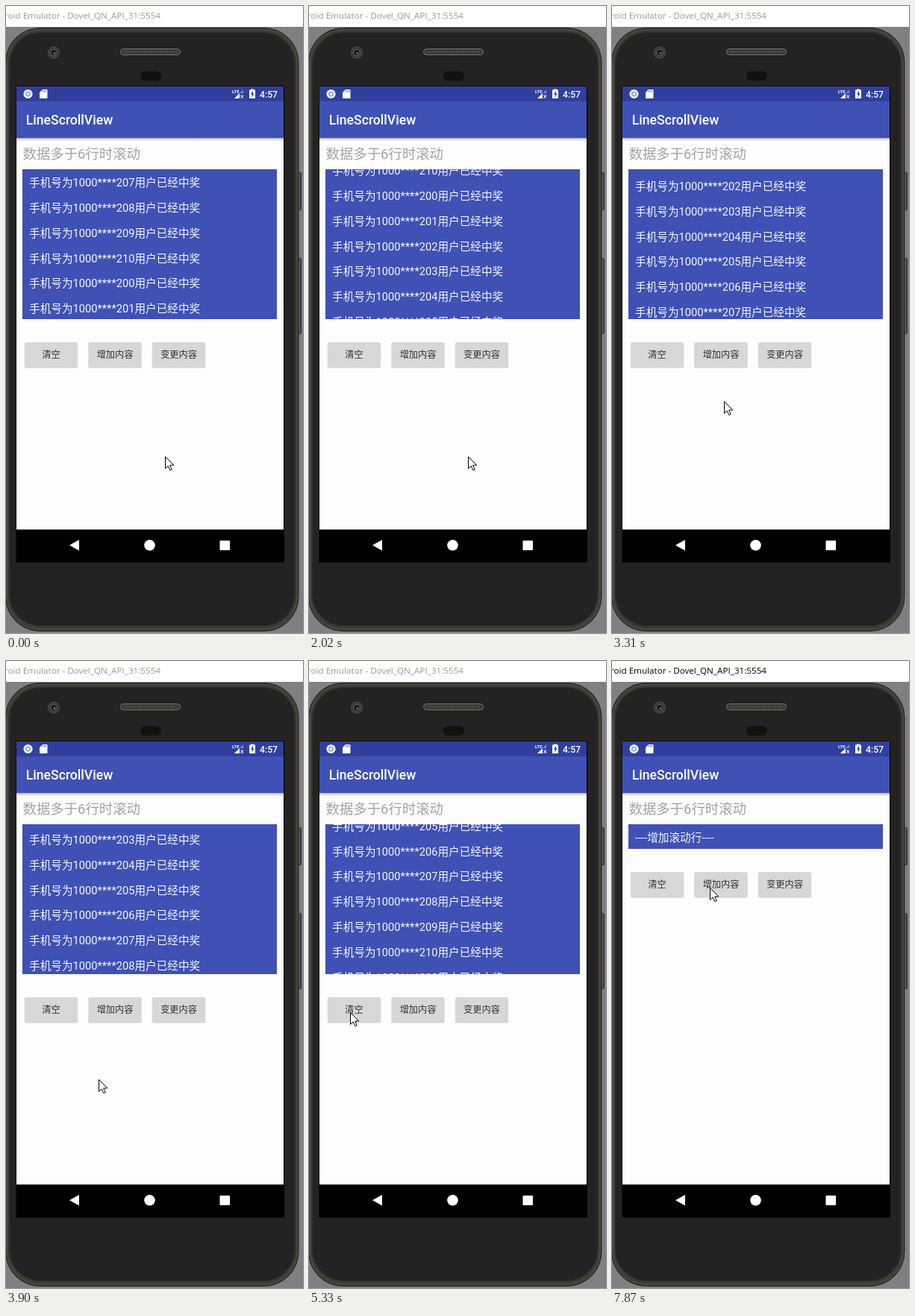
Animation of 398x841 px, one loop 8 s. Source, as an HTML page:

```html
<!DOCTYPE html>
<html lang="zh-CN">
<head>
<meta charset="utf-8">
<title>LineScrollView</title>
<style>
  html, body { margin: 0; width: 100%; height: 100%; overflow: hidden; background: #808080; }
  svg { display: block; width: 398px; height: 841px; }
  text { font-family: Roboto, "Noto Sans CJK SC", "Noto Sans CJK", sans-serif; white-space: pre; }
  #windowTitle { font: 11.65px "Open Sans", "Noto Sans", sans-serif; }
  #rows text { font-size: 14.65px; fill: #f6f7fd; }
  #buttons text { font-size: 12.2px; fill: #303030; text-anchor: middle; }
</style>
</head>
<body>
<svg viewBox="0 0 398 841">
  <defs>
    <linearGradient id="shade" x2="0" y2="1">
      <stop stop-color="#b8b8b8"/><stop offset="1" stop-color="#fdfdfd"/>
    </linearGradient>
    <linearGradient id="key">
      <stop stop-color="#3b3937"/><stop offset=".5" stop-color="#6b6967"/><stop offset="1" stop-color="#302e2d"/>
    </linearGradient>
    <clipPath id="listClip"><rect id="clipRect" x="22" y="219" width="341" height="201"/></clipPath>
  </defs>

  <rect width="398" height="841" fill="#808080"/>
  <rect width="398" height="28" fill="#fff"/>
  <text id="windowTitle" x="-2" y="17">roid Emulator - Dovel_QN_API_31:5554</text>

  <!-- phone body -->
  <g stroke="#302e2d">
    <rect x="390.5" y="223.5" width="5" height="50" rx="1.5" fill="url(#key)"/>
    <rect x="390.5" y="338.5" width="5" height="101" rx="1.5" fill="url(#key)"/>
  </g>
  <rect x="-.5" y="29.5" width="392.5" height="809" rx="46" fill="#3d3a37" stroke="#252321"/>
  <rect x="1.5" y="32" width="388.5" height="804" rx="44" fill="none" stroke="#55514d"/>
  <rect x="4.5" y="35.5" width="382.5" height="796" rx="42" fill="#242222" stroke="#2f2d2b"/>
  <circle cx="64" cy="62.5" r="7.5" fill="#393838" stroke="#555"/>
  <circle cx="64" cy="62.5" r="4.3" fill="#181818" stroke="#66686a"/>
  <circle cx="65" cy="63.5" r="1.5" fill="#707274"/>
  <rect x="153.5" y="57.5" width="80" height="8" rx="4" fill="#393836" stroke="#777572"/>
  <path d="M158 61.5H230" stroke="#4d4b49" stroke-width="3" stroke-dasharray="2 1"/>
  <rect x="180" y="87.5" width="28" height="12.5" rx="6" fill="#11110d"/>

  <!-- screen -->
  <rect x="13.5" y="107.5" width="359.5" height="639" fill="#000"/>
  <rect x="14" y="108" width="358" height="594" fill="#fdfdfd"/>
  <rect x="14" y="108" width="358" height="20" fill="#303f9f"/>
  <rect x="14" y="128" width="358" height="49" fill="#3f51b5"/>
  <rect x="14" y="177" width="358" height="4" fill="url(#shade)"/>
  <path d="M14 702.5H372" stroke="#2c4034"/>
  <rect x="14" y="703" width="358" height="43" fill="#000"/>

  <!-- status bar -->
  <circle cx="29.5" cy="118" r="4.8" fill="#8b94c9" stroke="#fff" stroke-width="2.6"/>
  <circle cx="29.5" cy="118" r="2.2" fill="#d9ddf0"/>
  <path d="M45 116L49 112H54.5Q55.5 112 55.5 113V123Q55.5 124 54.5 124H46Q45 124 45 123Z" fill="#fff"/>
  <path d="M49.5 113V115.5M51.5 113V115.5M53.5 113V115.5" stroke="#303f9f" stroke-width=".8"/>
  <path d="M318 112V117H313V124H306Z" fill="#7f89c4"/>
  <path d="M313 117V124H306Z" fill="#fff"/>
  <path d="M314.5 119.5L318 123.5M318 119.5L314.5 123.5" stroke="#fff" stroke-width="1.1"/>
  <text x="303" y="117" font-size="5.8" font-weight="700" fill="#fff">LTE</text>
  <path d="M328 112.5V111.5H332V112.5H334V124H326V112.5Z" fill="#fff"/>
  <path d="M331 113.5L328 118.5H329.7V122.5L332.4 117.5H331Z" fill="#303f9f"/>
  <text x="340" y="122.5" font-size="12.2" font-weight="500" fill="#fff">4:57</text>

  <text x="26.8" y="159.3" font-size="17.6" font-weight="500" fill="#fff">LineScrollView</text>
  <text x="22.5" y="205" font-size="18.4" fill="#a3a3a3">数据多于6行时滚动</text>

  <!-- navigation bar -->
  <path d="M85 723.3L98 716V730.6Z" fill="#fff"/>
  <circle cx="192.5" cy="723.3" r="7.3" fill="#fff"/>
  <rect x="286.5" y="717" width="13.5" height="13" rx="1" fill="#fff"/>

  <rect id="panel" x="22" y="219" width="341" height="201" fill="#3f51b5"/>
  <g id="rows" clip-path="url(#listClip)"></g>
  <g id="buttons"></g>
  <path id="cursor" d="M.5 .5V16.5L4.2 13L6.8 18.7L9.2 17.7L6.7 12H11.8Z" fill="#fff" stroke="#000"/>
</svg>

<script>
const DURATION = 8000, PITCH = 33.87, LIST_TOP = 219, FIRST_BASELINE = 242;
const CLEAR_AT = 5980, ADD_AT = 7210;
const byId = id => document.getElementById(id);

function add(parent, tag, attrs, label = '') {
  const node = document.createElementNS('http://www.w3.org/2000/svg', tag);
  for (const name in attrs) node.setAttribute(name, attrs[name]);
  node.textContent = label;
  return parent.appendChild(node);
}

const rows = Array.from({ length: 7 }, () => add(byId('rows'), 'text', { x: 31 }));
const buttonFaces = ['清空', '增加内容', '变更内容'].map((label, i) => {
  const x = 25 + i * 85.5, group = byId('buttons');
  add(group, 'rect', { x: x - .3, y: .8, width: 71.6, height: 34, rx: 2.5, fill: '#dedede' });
  const face = add(group, 'rect', { x, y: 0, width: 71, height: 34, rx: 2 });
  add(group, 'text', { x: x + 35.5, y: 21.3 }, label);
  return face;
});

// Linear interpolation through [position, ...values] keys.
function track(keys, at) {
  const next = keys.findIndex(key => key[0] > at);
  if (next < 0) return keys.at(-1).slice(1);
  if (next === 0) return keys[0].slice(1);
  const from = keys[next - 1], to = keys[next];
  const mix = (at - from[0]) / (to[0] - from[0]);
  return from.slice(1).map((value, i) => value + (to[i + 1] - value) * mix);
}

// The screen refreshes in bursts of 14 evenly spaced steps.
const bursts = [[50, 820], [880, 1660], [1720, 2490], [2540, 3310], [3360, 4140], [4200, 4970], [5030, 5810], [5860, 6640]];
function refreshCount(t) {
  let count = 0;
  for (const [start, end] of bursts) {
    if (t >= start) count += Math.min(14, 1 + Math.floor((t - start + 9) / (end - start) * 13));
  }
  return count;
}

const scrollKeys = [[0, 0], [20, 68.8], [34, 117.7], [56, 198.4], [76, 270.2], [102, 363]];
const cursorKeys = [
  [2900, 213, 604], [3310, 150, 530], [3700, 128, 561], [4200, 118, 561], [4490, 73, 473],
  [4750, 55, 471], [6270, 55, 471], [6390, 49, 440], [6850, 131, 260], [7400, 131, 260], [7700, 131, 304]
];

function draw(t) {
  const scrolling = t < CLEAR_AT, added = t >= ADD_AT;
  const height = scrolling ? 201 : added ? 33 : 0;
  byId('panel').setAttribute('height', height);
  byId('clipRect').setAttribute('height', height);

  const offset = track(scrollKeys, refreshCount(t))[0];
  const first = Math.floor(offset / PITCH);
  rows.forEach((row, i) => {
    const index = first + i;
    row.setAttribute('y', FIRST_BASELINE + (scrolling ? index * PITCH - offset : i * PITCH));
    row.textContent = scrolling ? `手机号为1000****${200 + (index + 7) % 11}用户已经中奖`
      : added && i === 0 ? '----增加滚动行----' : '';
  });

  byId('buttons').setAttribute('transform', `translate(0 ${LIST_TOP + height + 31})`);
  const pressed = [t >= 5860 && t < 6400, t >= 7090 && t < 7600, false];
  buttonFaces.forEach((face, i) => face.setAttribute('fill', pressed[i] ? '#cbcdcc' : '#d6d8d7'));

  byId('windowTitle').setAttribute('fill', t < 5750 ? '#999' : '#000');
  const [x, y] = track(cursorKeys, t).map(Math.round);
  byId('cursor').setAttribute('transform', `translate(${x} ${y})`);
}

function tick() {
  draw(performance.now() % DURATION);
  requestAnimationFrame(tick);
}
tick();
</script>
</body>
</html>
```
